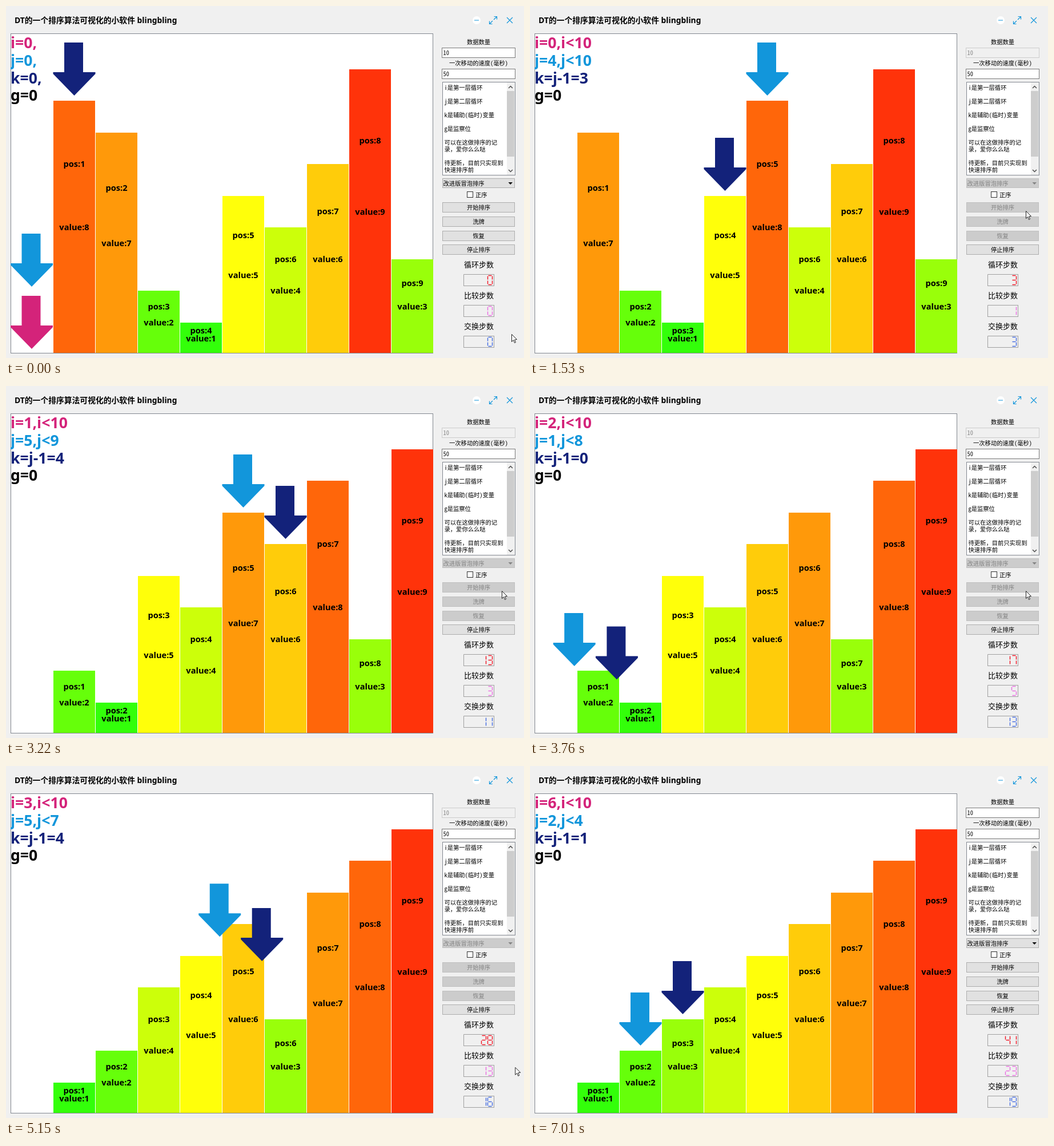
An HTML page with a canvas for the animation above (7160 ms loop, 907 by 617 pixels).

```html
<!DOCTYPE html>
<html lang="zh-CN">
<head>
<meta charset="utf-8">
<title>排序可视化</title>
<style>
  html, body { margin: 0; width: 100%; height: 100%; overflow: hidden; background: #f0f0f0; }
  canvas { display: block; }
</style>
</head>
<body>
<canvas width="907" height="617"></canvas>
<script>
const ctx = document.querySelector('canvas').getContext('2d');
const LOOP = 7160, START = 750, PHASE = 99.27, TRAVEL = 50, FINISH = 6780;
const PINK = '#d4237a', BLUE = '#1296db', NAVY = '#13227a';
const BOLD = '"Noto Sans", "Noto Sans CJK SC", "Noto Sans CJK JP", sans-serif';
const PLAIN = '"Noto Sans Mono CJK SC", "Noto Sans CJK SC", "Noto Sans CJK JP", sans-serif';
const INITIAL = [8, 7, 2, 1, 5, 4, 6, 9, 3];
const LAST_LOOP = 41;

const lerp = (a, b, p) => a + (b - a) * p;
const clamp = x => Math.max(0, Math.min(1, x));
const gray = v => `rgb(${v},${v},${v})`;
const slotX = slot => 9 + 74 * slot;
const barTop = value => Math.round(610 - 55.5 * (value || 0));
const arrowAt = (slot, value) => [slotX(slot), barTop(value) - 102];
const HOME = [8.5, 399];

// Bubble sort recorded as phases: the arrows advance, then the bars may swap.
function recordSort() {
  const phases = [];
  let order = INITIAL, loops = 0, compares = 1, swaps = 0;
  let blue = HOME, navy = arrowAt(1, 8);
  const add = (i, j, swapped, blueTo, navyTo) => {
    phases.push({ i, j, order, swapped, counts: [loops, compares, swaps],
                  blue: [blue, blueTo], navy: [navy, navyTo] });
    blue = blueTo;
    navy = navyTo;
  };
  for (let i = 0; loops < LAST_LOOP; i++) {
    blue = HOME;
    navy = arrowAt(1, order[0]);
    for (let j = 1; j < 10 - i && loops < LAST_LOOP; j++) {
      const left = order[j - 1], right = order[j];
      add(i, j, false, arrowAt(j, left), arrowAt(j + 1, right));
      if (left > right) {
        order = order.slice();
        order[j - 1] = right;
        order[j] = left;
        add(i, j, true, arrowAt(j + 1, left), arrowAt(j, right));
        swaps++;
      } else compares++;
      loops++;
    }
  }
  return { phases, total: [loops, compares, swaps] };
}
const sort = recordSort();

// The screen refreshes in bursts of about 77 ms steps.
const BURSTS = [0, 70, 840, 1610, 2380, 3140, 3910, 4680, 5470, 6240, 7010];
function refreshTime(t) {
  const start = BURSTS.filter(b => b <= t).pop();
  const steps = start === 6240 ? 7 : start % 7010 === 0 ? 0 : 9;
  const n = Math.min(steps, Math.floor((t - start + 5) / 76.7));
  return start + Math.round(n * 7.67) * 10;
}

function box(x, y, w, h, fill, border) {
  ctx.fillStyle = border || fill;
  ctx.fillRect(x, y, w, h);
  ctx.fillStyle = fill;
  if (border) ctx.fillRect(x + 1, y + 1, w - 2, h - 2);
}
function shape(points, fill, stroke) {
  ctx.beginPath();
  points.forEach(([x, y]) => ctx.lineTo(x, y));
  ctx.closePath();
  ctx.fillStyle = fill;
  ctx.fill();
  if (stroke) { ctx.strokeStyle = stroke; ctx.lineWidth = 1; ctx.stroke(); }
}
function lines(color, width, ...paths) {
  ctx.strokeStyle = color;
  ctx.lineWidth = width;
  ctx.beginPath();
  for (const [x, y, ...rest] of paths) {
    ctx.moveTo(x, y);
    for (let n = 0; n < rest.length; n += 2) ctx.lineTo(rest[n], rest[n + 1]);
  }
  ctx.stroke();
}
function text(str, x, y, size, { color = '#000', bold = false, align = 'left' } = {}) {
  ctx.font = `${bold ? 'bold ' : ''}${size}px ${bold ? BOLD : PLAIN}`;
  ctx.fillStyle = color;
  ctx.textAlign = align;
  ctx.fillText(str, x, y);
}
const small = (str, x, middle, options) => text(str, x, middle + 4, 10.3, options);

function drawArrow(x, y, color) {
  const points = [[19, 0], [52, 0], [52, 52], [73.5, 52], [73.5, 55], [36.5, 93], [-.5, 55], [-.5, 52], [19, 52]];
  shape(points.map(([dx, dy]) => [x + dx, y + dy]), color);
}

function drawBar(value, x, slot) {
  const top = barTop(value), height = 55.5 * value;
  box(x, top, 73, 608 - top, `rgb(${Math.min(255, 51 * value)},${Math.min(255, 51 * (10 - value))},10)`);
  const label = { bold: true, align: 'center' };
  text('pos:' + slot, x + 36.5, top + height / 4 + 5, 14.6, label);
  text('value:' + value, x + 36.5, top + height / 2 + 5, 14.6, label);
}

function drawStage(t) {
  box(8, 48, 740, 561, '#fff', '#828790');
  ctx.save();
  ctx.beginPath();
  ctx.rect(8, 49, 740, 559);
  ctx.clip();

  const elapsed = t - START, running = elapsed >= 0;
  const n = Math.min(sort.phases.length - 1, Math.max(0, Math.floor(elapsed / PHASE)));
  const phase = sort.phases[n];
  const p = clamp((elapsed - n * PHASE) / TRAVEL);

  for (const value of INITIAL) {
    const index = phase.order.indexOf(value), slot = index + 1;
    let from = slot;
    if (phase.swapped && index === phase.j) from--;
    if (phase.swapped && index === phase.j - 1) from++;
    drawBar(value, Math.round(lerp(slotX(from), slotX(slot), p)), slot);
  }
  if (!running) drawArrow(...[8.5, 508], PINK);
  for (const [path, color] of [[phase.blue, BLUE], [phase.navy, NAVY]]) {
    const [from, to] = path;
    drawArrow(lerp(from[0], to[0], p), lerp(from[1], to[1], p), color);
  }

  const { j } = phase;
  const i = p < 1 ? phase.i : (sort.phases[n + 1] || phase).i;
  const readout = running
    ? [`i=${i},i<10`, `j=${j},j<${10 - phase.i}`, `k=j-1=${j - 1}`, 'g=0']
    : ['i=0,', 'j=0,', 'k=0,', 'g=0'];
  readout.forEach((line, row) =>
    text(line, 8, 74 + 30.8 * row, 26.6, { bold: true, color: [PINK, BLUE, NAVY, '#000'][row] }));
  ctx.restore();

  if (!running) return [0, 0, 0];
  return elapsed >= sort.phases.length * PHASE ? sort.total : phase.counts;
}

function drawTitleBar() {
  text('DT的一个排序算法可视化的小软件 blingbling', 15, 30, 13.8, { bold: true });
  ctx.beginPath();
  ctx.arc(824, 25, 7, 0, 7);
  ctx.fillStyle = '#fff';
  ctx.fill();
  lines(BLUE, 1.2, [820, 25, 828, 25],
    [854, 24, 859, 19], [854.5, 18.5, 859.5, 18.5, 859.5, 23.5],
    [852, 26, 847, 31], [846.5, 26.5, 846.5, 31.5, 851.5, 31.5],
    [877, 20, 887, 30], [887, 20, 877, 30]);
}

function drawInput(label, value, y, off) {
  small(label, 827.5, y - 10, { align: 'center' });
  box(763, y, 129, 18, off ? '#f0f0f0' : '#fff', off ? '#ccc' : '#7a7a7a');
  small(value, 765.5, y + 9, { color: off ? '#838383' : '#000' });
}
function drawButton(label, middle, off) {
  box(764, middle - 9, 127, 18, gray(lerp(225, 204, off)), gray(lerp(173, 191, off)));
  small(label, 827.5, middle, { align: 'center', color: gray(lerp(0, 131, off)) });
}

function drawNotes() {
  box(764, 133, 128, 164, '#fff', '#828790');
  const notes = ['i是第一层循环', '', 'j是第二层循环', '', 'k是辅助(临时)变量', '', 'g是监察位', '',
    '可以在这做排序的记', '录，爱你么么哒', '', '待更新，目前只实现到', '快速排序前'];
  notes.forEach((line, row) => small(line, 767.5, 143 + 12 * row));
  box(877, 134, 14, 162, '#f0f0f0');
  box(877, 149, 13, 115, '#cdcdcd');
  lines('#505050', 1.5, [880, 144, 883.5, 140.5, 887, 144], [880, 287, 883.5, 290.5, 887, 287]);
}

// Segments a to g of a seven-segment digit.
const SEGMENTS = { a: [1, 0, 7, 0], b: [8, 1, 8, 7], c: [8, 9, 8, 15], d: [1, 16, 7, 16],
                   e: [0, 9, 0, 15], f: [0, 1, 0, 7], g: [1, 8, 7, 8] };
const DIGITS = ['abcdef', 'bc', 'abged', 'abgcd', 'fgbc', 'afgcd', 'afgedc', 'abc', 'abcdefg', 'abcdfg'];

function drawCounter(label, value, y, color) {
  text(label, 828, y - 12, 13, { align: 'center' });
  box(801, y, 54, 21, '#f0f0f0');
  lines('#a0a0a0', 1, [801.5, y + 21, 801.5, y + .5, 855, y + .5]);
  lines('#fff', 1, [802, y + 20.5, 854.5, y + 20.5, 854.5, y + 1]);
  lines('#a0a0a0', 1, [854.5, y, 854.5, y + 21], [801, y + 20.5, 855, y + 20.5]);
  [...String(value)].reverse().forEach((digit, place) => {
    const x = 843.5 - 11 * place;
    for (const name of DIGITS[digit]) {
      const [x1, y1, x2, y2] = SEGMENTS[name];
      lines(color, 1.4, [x + x1, y + 2.5 + y1, x + x2, y + 2.5 + y2]);
    }
  });
}

function drawSidebar(t, counts) {
  const busy = t >= START && t < FINISH;
  const off = busy ? clamp((t - START) / 250) : 0;
  drawInput('数据数量', '10', 73, busy);
  drawInput('一次移动的速度(毫秒)', '50', 110, false);
  drawNotes();

  const ink = gray(lerp(0, 131, off));
  box(764, 302, 127, 17, gray(lerp(225, 204, off)), gray(lerp(173, 191, off)));
  small('改进版冒泡排序', 765.5, 311, { color: ink });
  shape([[879.5, 309], [887, 309], [883.25, 313]], ink);
  box(807, 325, 11, 11, '#fff', '#333');
  small('正序', 822, 331);

  drawButton('开始排序', 353, t >= FINISH && t < 7010 ? .4 : off);
  drawButton('洗牌', 378, off);
  drawButton('恢复', 403, off);
  drawButton('停止排序', 427, 0);

  drawCounter('循环步数', counts[0], 470, '#f01020');
  drawCounter('比较步数', counts[1], 524, '#e868e0');
  drawCounter('交换步数', counts[2], 578, '#4169e1');
}

const CURSOR_PATH = [[0, 885, 575], [690, 868, 359], [4520, 868, 359], [4600, 871, 361],
                     [4990, 902, 606], [5390, 868, 359], [LOOP, 868, 359]];
function drawCursor(t) {
  if (t >= FINISH) return;
  const next = CURSOR_PATH.findIndex(key => key[0] > t);
  const [t0, x0, y0] = CURSOR_PATH[next - 1], [t1, x1, y1] = CURSOR_PATH[next];
  const p = (t - t0) / (t1 - t0), ease = p * p * (3 - 2 * p);
  const x = lerp(x0, x1, ease) + .5, y = lerp(y0, y1, ease) + .5;
  const points = [[0, 0], [0, 13], [3, 10], [5, 15], [7, 14], [5, 9.5], [9, 9]];
  shape(points.map(([dx, dy]) => [x + dx, y + dy]), '#fff', '#222');
}

function draw(now) {
  const t = refreshTime(now % LOOP);
  box(0, 0, 907, 617, '#f0f0f0');
  drawTitleBar();
  drawSidebar(t, drawStage(t));
  drawCursor(t);
  requestAnimationFrame(draw);
}
requestAnimationFrame(draw);
</script>
</body>
</html>
```
